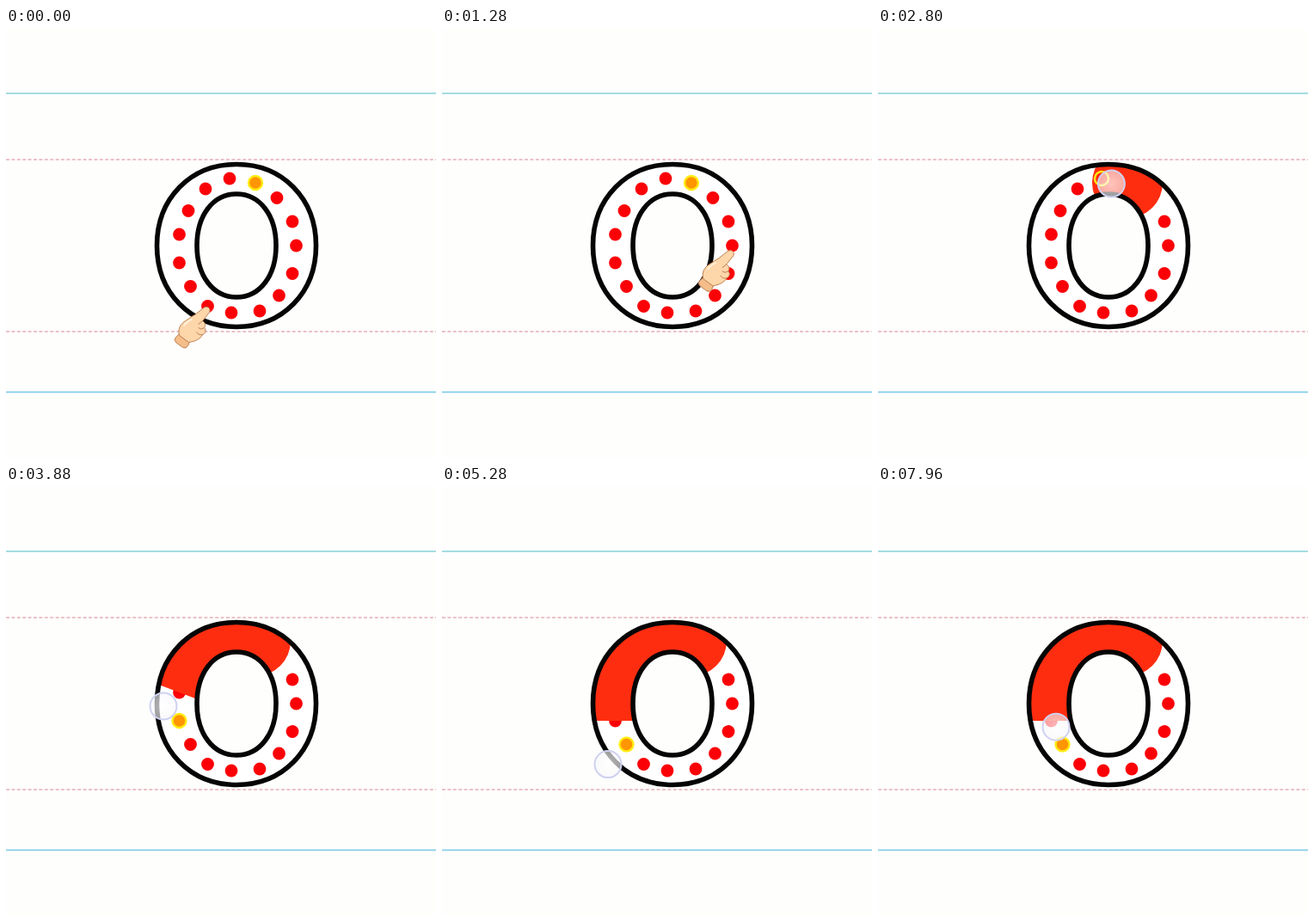
These frames come from a looping animation (500 by 500 pixels, 8000 ms). An HTML page:

```html
<!DOCTYPE html>
<html lang="en">
<head>
<meta charset="utf-8">
<title>Letter tracing</title>
<style>
  html, body { margin: 0; width: 100%; height: 100%; overflow: hidden; background: #fefefd; }
  svg { display: block; width: 100vw; height: 100vh; }
</style>
</head>
<body>
<svg viewBox="0 0 500 500">
  <defs>
    <clipPath id="body"><path id="bodyShape" clip-rule="evenodd"/></clipPath>
    <radialGradient id="glass">
      <stop offset="0" stop-color="#fff" stop-opacity=".72"/>
      <stop offset="1" stop-color="#f6f6fa" stop-opacity=".62"/>
    </radialGradient>
  </defs>

  <g fill="none">
    <path d="M0 76H500" stroke="#86d0d6" stroke-width="1.5"/>
    <path d="M0 423.3H500" stroke="#85cdea" stroke-width="1.8"/>
    <path d="M0 153H500M0 353H500" stroke="#d98793" stroke-width="1.2" stroke-dasharray="4 2.4"/>
  </g>

  <path id="paper" fill="#fff" fill-rule="evenodd"/>
  <g id="dots" fill="#fb0007"></g>
  <circle id="active" r="8" fill="#ff9500"/>
  <g clip-path="url(#body)">
    <g id="paint">
      <circle id="cap" r="41" fill="#ff2d10"/>
      <path id="trail" fill="none" stroke="#ff2d10" stroke-width="82" stroke-linejoin="bevel"/>
    </g>
  </g>
  <circle id="ring" r="8" fill="none" stroke="#ffec14" stroke-width="2.4"/>
  <path id="outline" fill="none" stroke="#050505" stroke-width="5.6"/>

  <g id="hand" stroke="#bd8052" stroke-width="1" stroke-linejoin="round">
    <path d="M-36 34Q-39 37-36 40L-28 46Q-24 48-22 44L-20 39-32 30Z" fill="#f4bd8a"/>
    <path d="M-32 32C-34 24-31 19-25 15C-20 12-18 10-14 8L-4 0C0-3 5 0 3 5L-5 15C-2 17-1 20-3 23C0 26-2 30-5 31C-7 36-14 39-21 40Z" fill="#fdd6aa"/>
    <path d="M-5 15L-10 19M-3 23Q-7 26-10 23M-5 31Q-10 32-12 28" fill="none"/>
    <path d="M-27 21Q-24 16-17 13" fill="none" stroke="#fff0da" stroke-width="2"/>
  </g>

  <circle id="touch" r="15.5" fill="url(#glass)" stroke="#cfd1f0" stroke-width="2"/>
</svg>

<script>
const DURATION = 8000;
const el = id => document.getElementById(id);
const show = (node, visible) => { node.style.display = visible ? "" : "none"; };
const moveTo = (node, [x, y]) => node.setAttribute("transform", `translate(${x} ${y})`);

const dots = [
  [290, 180], [260, 175], [232, 187], [212, 212.5], [201.5, 240],
  [201.5, 273], [214.5, 300.5], [234.5, 323.5], [262, 331], [295, 329],
  [317.5, 311], [333, 285.5], [337.5, 253], [333, 225], [315, 197.5]
];

// time, x, y
const handSteps = dots.slice(7).map(([x, y], i) => [i * 264, x - 1, y + 2]);
const dragSteps = [
  [2520, 290, 180], [2800, 271.5, 181], [3300, 212, 204], [3880, 183, 256],
  [4500, 184, 285], [5120, 190, 308], [5280, 193, 323.5], [5960, 212, 353],
  [6200, 226.5, 364.5], [6840, 245, 372], [7200, 247, 372]
];
const retrySteps = [[7680, 198, 215], [7960, 207, 280], [8000, 208, 285]];

// When the paint snaps to the next dot
const paintTimes = [2520, 2960, 3200, 3440, 3760, 4240];

function oval(cx, cy, rx, ry, k) {
  const a = rx * k, b = ry * k;
  return `M${cx} ${cy - ry}` +
    `c${a} 0 ${rx} ${ry - b} ${rx} ${ry}s${a - rx} ${ry} ${-rx} ${ry}` +
    `s${-rx} ${b - ry} ${-rx} ${-ry}s${rx - a} ${-ry} ${rx} ${-ry}z`;
}

function at(steps, t) {
  const n = steps.findIndex(step => step[0] > t);
  if (n < 1) return n === 0 || t > steps.at(-1)[0] ? null : steps.at(-1).slice(1);
  const [t0, x0, y0] = steps[n - 1], [t1, x1, y1] = steps[n];
  const p = (t - t0) / (t1 - t0);
  return [x0 + (x1 - x0) * p, y0 + (y1 - y0) * p];
}

const letter = oval(268, 253, 92.5, 94.5, 0.58) + oval(268, 253, 46, 60, 0.59);
for (const id of ["bodyShape", "paper", "outline"]) el(id).setAttribute("d", letter);

const dotNodes = dots.map(point => {
  const node = document.createElementNS("http://www.w3.org/2000/svg", "circle");
  node.setAttribute("r", 7.4);
  moveTo(node, point);
  return el("dots").appendChild(node);
});
moveTo(el("cap"), dots[0]);

function place(node, point) {
  show(node, point);
  if (point) moveTo(node, point);
}

function draw(t) {
  const reached = paintTimes.filter(time => time <= t).length - 1;
  const next = reached + 1;
  dotNodes.forEach((node, i) => show(node, i !== next));
  moveTo(el("active"), dots[next]);
  moveTo(el("ring"), dots[next]);
  show(el("paint"), reached >= 0);
  el("trail").setAttribute("d", reached > 0 ? "M" + dots.slice(0, next).join("L") : "");
  place(el("hand"), at(handSteps, t));
  place(el("touch"), at(dragSteps, t) || at(retrySteps, t));
}

const start = performance.now();
function tick() {
  draw((performance.now() - start) % DURATION);
  requestAnimationFrame(tick);
}
tick();
</script>
</body>
</html>
```
